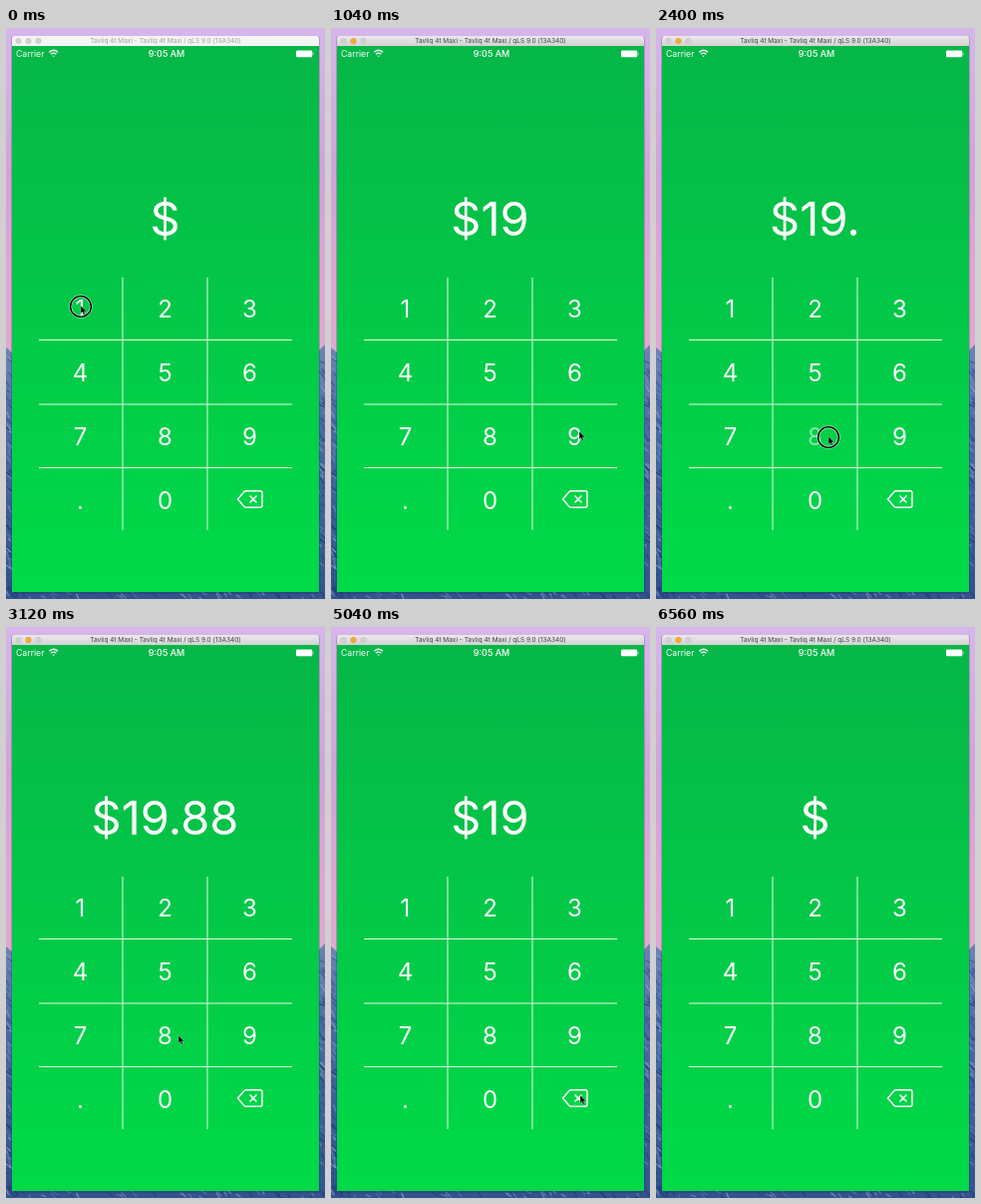
Animation, 320 px wide and 572 px high, one loop 6640 ms. Source, as an HTML page:

```html
<!DOCTYPE html>
<html lang="en">
<head>
<meta charset="utf-8">
<title>Amount keypad</title>
<style>
  html, body { margin: 0; width: 100%; height: 100%; overflow: hidden; }
  svg { display: block; width: 100vw; height: 100vh; }
  text { font-family: Inter, sans-serif; text-anchor: middle; fill: #fff; }
</style>
</head>
<body>
<svg viewBox="0 0 320 572">
  <defs>
    <linearGradient id="sky" x2="0" y2="1">
      <stop offset="0" stop-color="#d6b6ea"/>
      <stop offset=".25" stop-color="#d2a2dc"/>
      <stop offset=".45" stop-color="#e2a4d6"/>
      <stop offset=".57" stop-color="#e0a8d2"/>
    </linearGradient>
    <linearGradient id="rock" x2="0" y2="1">
      <stop offset="0" stop-color="#7082b6"/>
      <stop offset=".35" stop-color="#4a69a6"/>
      <stop offset="1" stop-color="#33528e"/>
    </linearGradient>
    <linearGradient id="green" x2="0" y2="1">
      <stop offset="0" stop-color="#05b747"/>
      <stop offset="1" stop-color="#00da48"/>
    </linearGradient>
    <linearGradient id="bar" x2="0" y2="1">
      <stop offset="0" stop-color="#ebe9ec"/>
      <stop offset="1" stop-color="#d3d1d4"/>
    </linearGradient>
  </defs>

  <rect width="320" height="572" fill="url(#sky)"/>
  <path d="M0 320L7 326L160 400L313 324L320 317V572H0Z" fill="url(#rock)"/>
  <g id="streaks" fill="none" stroke-width="1.300"/>

  <rect x="5" y="8" width="310" height="559" rx="3" fill="#201838" opacity=".2"/>
  <path d="M6 18V10.500Q6 8 8.500 8H311.500Q314 8 314 10.500V18Z" id="titleBar"/>
  <g id="lights" stroke-width=".5"></g>
  <text id="title" x="160" y="15.300" font-size="6.500">Tavliq 4t Maxi - Tavliq 4t Maxi / qLS 9.0 (13A340)</text>

  <rect x="6" y="18" width="308" height="547" fill="url(#green)"/>
  <text x="10" y="29" font-size="8.700" style="text-anchor:start">Carrier</text>
  <g fill="none" stroke="#fff" stroke-width="1.300">
    <path d="M43.300 24.200Q47.700 20.400 52.100 24.200M45 26.300Q47.700 24 50.400 26.300"/>
    <path d="M46.400 27.700L47.700 29L49 27.700Z" fill="#fff" stroke="none"/>
  </g>
  <text x="161" y="29" font-size="9" font-weight="500">9:05 AM</text>
  <rect x="291" y="22.600" width="16.300" height="6.700" rx="1.200" fill="#fff"/>
  <path d="M307.900 24.700Q309.700 25.950 307.900 27.200Z" fill="#fff"/>

  <text id="amount" x="159.500" y="207.800" font-size="47"/>
  <path d="M117 250V503M202 250V503M33 312.500H287M33 377H287M33 440.500H287"
        stroke="#e2f9e8" stroke-width="1"/>
  <g id="keys" font-size="24"/>

  <g id="pointer">
    <g id="ring" fill="none">
      <circle r="10.300" stroke="#fff" stroke-opacity=".55" stroke-width="3"/>
      <circle r="10.400" stroke="#000" stroke-width="1.400"/>
    </g>
    <path d="M0 -1V7L1.800 5.400L3.100 8.200L4.400 7.600L3.200 4.900H5.600Z"
          fill="#000" stroke="#fff" stroke-opacity=".65" stroke-width=".5"/>
  </g>
</svg>
<script>
const LOOP = 6640, STEP = 80;
const $ = id => document.getElementById(id);

function add(parent, tag, attrs, text = "") {
  const el = document.createElementNS("http://www.w3.org/2000/svg", tag);
  for (const name in attrs) el.setAttribute(name, attrs[name]);
  el.textContent = text;
  return parent.appendChild(el);
}

// Rocky texture visible beside and below the window
let seed = 11;
const random = () => (seed = seed * 16807 % 2147483647) / 2147483647;
const shades = ["#14326e", "#7f94c2", "#a9b6d6", "#2c4c8a"];
function streak(x, y) {
  add($("streaks"), "path", {
    d: `M${x} ${y}l${2 + random() * 4} ${2 + random() * 5}`,
    stroke: shades[Math.floor(random() * 4)],
    opacity: 0.3 + random() * 0.4
  });
}
for (let i = 0; i < 60; i++) {
  streak(random() * 4 - 1, 328 + random() * 237);
  streak(313 + random() * 5, 330 + random() * 235);
  streak(random() * 320, 564 + random() * 6);
}

const lights = [12.5, 22.5, 32.5].map(cx => add($("lights"), "circle", { cx, cy: 13, r: 2.7 }));

// Keypad
const DELETE = "del";
const keys = {};
["1", "2", "3", "4", "5", "6", "7", "8", "9", ".", "0", DELETE].forEach((label, i) => {
  const x = 74.5 + 85 * (i % 3), y = 290 + 63.9 * Math.floor(i / 3);
  keys[label] = label === DELETE
    ? add($("keys"), "path", {
        d: "M232.500 472L239 464.500Q239.800 463.700 241 463.700H255Q257 463.700 257 465.700V478.300"
         + "Q257 480.300 255 480.300H241Q239.800 480.300 239 479.500ZM244.500 468.500L251.500 475.500M251.500 468.500L244.500 475.500",
        fill: "none", stroke: "#fff", "stroke-width": 1.5, "stroke-linejoin": "round"
      })
    : add($("keys"), "text", { x, y }, label);
});

// The key dims one step after the press; the amount changes on release
const HOLD = 160;
const presses = [
  [0, "1"], [800, "9"], [1600, "."], [2320, "8"], [2720, "8"],
  [3680, DELETE], [4160, DELETE], [4640, DELETE], [5120, DELETE], [5600, DELETE]
];

// Pointer stops: time, x, y
const stops = [
  [0, 75, 279], [240, 75, 279], [720, 249, 405], [1120, 249, 405],
  [1520, 75, 471], [1920, 75, 471], [2240, 173, 410], [3200, 173, 410],
  [3600, 250, 470], [5920, 250, 470], [6400, 334, 494], [LOOP, 334, 494]
];

function pointerAt(t) {
  const i = stops.findIndex(stop => stop[0] > t);
  const [t0, x0, y0] = stops[i - 1], [t1, x1, y1] = stops[i];
  const p = (t - t0) / (t1 - t0), ease = p * p * (3 - 2 * p);
  return [x0 + (x1 - x0) * ease, y0 + (y1 - y0) * ease];
}

function draw(t) {
  let amount = "$", pressed = false, dimmed = null;
  for (const [start, key] of presses) {
    if (t >= start + HOLD) amount = key === DELETE ? amount.slice(0, -1) : amount + key;
    else if (t >= start) {
      pressed = true;
      if (t >= start + STEP) dimmed = key;
    }
  }
  $("amount").textContent = amount;
  for (const key in keys) keys[key].setAttribute("opacity", key === dimmed ? 0.5 : 1);
  $("pointer").setAttribute("transform", `translate(${pointerAt(t)})`);
  $("ring").setAttribute("visibility", pressed ? "visible" : "hidden");

  // The window gains focus after the first click
  const active = t >= STEP;
  $("titleBar").setAttribute("fill", active ? "url(#bar)" : "#f5f4f5");
  $("title").style.fill = active ? "#414141" : "#a0a0a0";
  lights.forEach((light, i) => {
    const orange = active && i === 1;
    light.setAttribute("fill", orange ? "#f6a82f" : "#d2d0d2");
    light.setAttribute("stroke", orange ? "#d98c22" : "#bdbbbd");
  });
}

const origin = performance.now();
function tick() {
  const t = (performance.now() - origin) % LOOP;
  draw(Math.floor(t / STEP) * STEP);
  requestAnimationFrame(tick);
}
tick();
</script>
</body>
</html>
```
